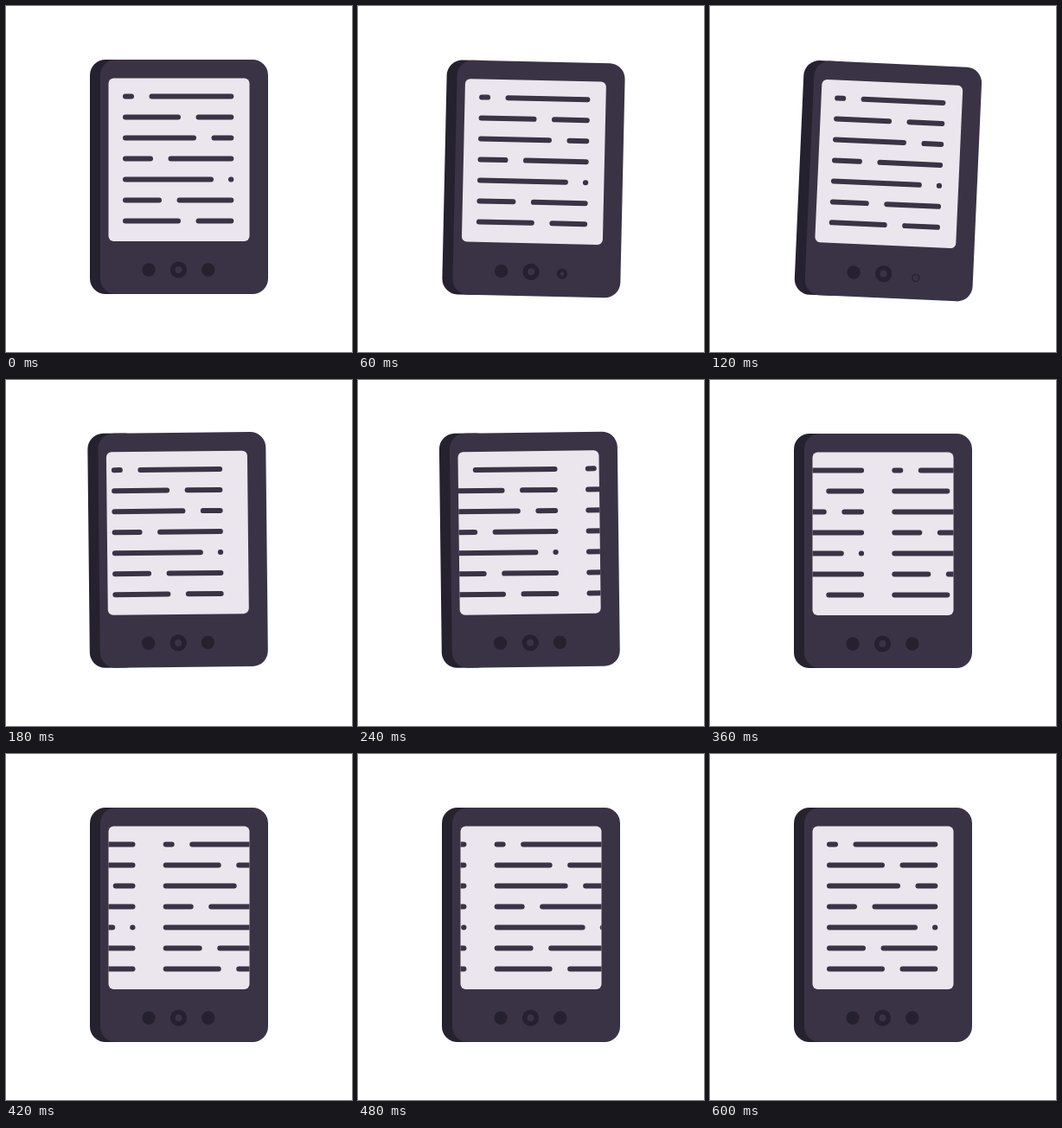
Animation, 400 px wide and 400 px high, one loop 2.16 s. Source, as an HTML page:

```html
<!DOCTYPE html>
<html lang="en">
<head>
<meta charset="utf-8">
<title>E-reader page turn</title>
<style>
  html, body { margin: 0; width: 100%; height: 100%; overflow: hidden; background: #fff; }
  svg { display: block; width: 100vw; height: 100vh; }
  .body { fill: #3a3346; }
  .dark { fill: #26212e; }
  .screen { fill: #ebe6ed; }
  .text { fill: none; stroke: #3a3346; stroke-width: 6; stroke-linecap: round; }
</style>
</head>
<body>
<svg viewBox="0 0 400 400">
  <defs>
    <clipPath id="glass"><rect x="118.5" y="83.5" width="163" height="188.5" rx="6"/></clipPath>
  </defs>
  <g id="reader">
    <rect class="dark" x="97" y="62" width="60" height="271" rx="18"/>
    <rect class="body" x="109" y="62" width="194" height="271" rx="18"/>
    <rect class="screen" x="118.5" y="83.5" width="163" height="188.5" rx="6"/>
    <g clip-path="url(#glass)"><path id="pages" class="text"/></g>
    <circle class="dark" cx="165" cy="305" r="7.7"/>
    <circle class="dark" cx="199.5" cy="305" r="9.6"/>
    <circle class="body" cx="199.5" cy="305" r="4"/>
    <g id="button">
      <circle class="dark" cx="233.8" cy="305" r="7.7"/>
      <circle id="hole" class="body" cx="233.8" cy="305" r="0"/>
    </g>
  </g>
</svg>
<script>
  const LOOP = 2160, STEP = 30, SETTLED = 600;
  const PAGE = 160.5;
  const PIVOT = '97 333';

  // Right end of the first dash and left end of the second, per row
  const ROWS = [[148, 165.5], [202, 219.5], [220, 237.5], [170, 187.5], [240, 257], [180, 197.5], [202, 219.5]];

  // Values at successive steps
  const TILT = [0, 0.32, 1.27, 2.2, 2.55, 1.1, -0.6, -0.95, -0.7, -0.3, -0.08, 0];
  const PRESS = [0, 0.15, 0.5, 0.85, 1, 0.5, 0];

  const $ = id => document.getElementById(id);
  const reader = $('reader'), pages = $('pages'), button = $('button'), hole = $('hole');

  const dash = (x1, x2, y) => `M${x1 + 3} ${y}H${x2 - 3 + 0.01}`;
  const page = shift => ROWS.map(([a, b], i) => {
    const y = 104.5 + i * 24;
    return dash(135 + shift, a + shift, y) + dash(b + shift, 263.3 + shift, y);
  }).join('');
  pages.setAttribute('d', page(0) + page(PAGE));

  function scroll(t) {
    if (t <= 95 || t >= SETTLED) return 0;
    return PAGE * (1 - Math.cos(Math.PI * (t - 95) / 510)) / 2;
  }

  function draw(now) {
    const step = Math.floor(now % LOOP / STEP);
    const press = PRESS[step] || 0;
    const scale = 1 - 0.4 * press;

    reader.setAttribute('transform', `rotate(${TILT[step] || 0} ${PIVOT})`);
    pages.setAttribute('transform', `translate(${-scroll(step * STEP)} 0)`);
    // The button shrinks toward its lower right corner
    button.setAttribute('transform', `translate(241.5 312.7) scale(${scale}) translate(-241.5 -312.7)`);
    hole.setAttribute('r', 5.6 * press);
  }

  const start = performance.now();
  function tick() {
    draw(performance.now() - start);
    requestAnimationFrame(tick);
  }
  tick();
</script>
</body>
</html>
```
